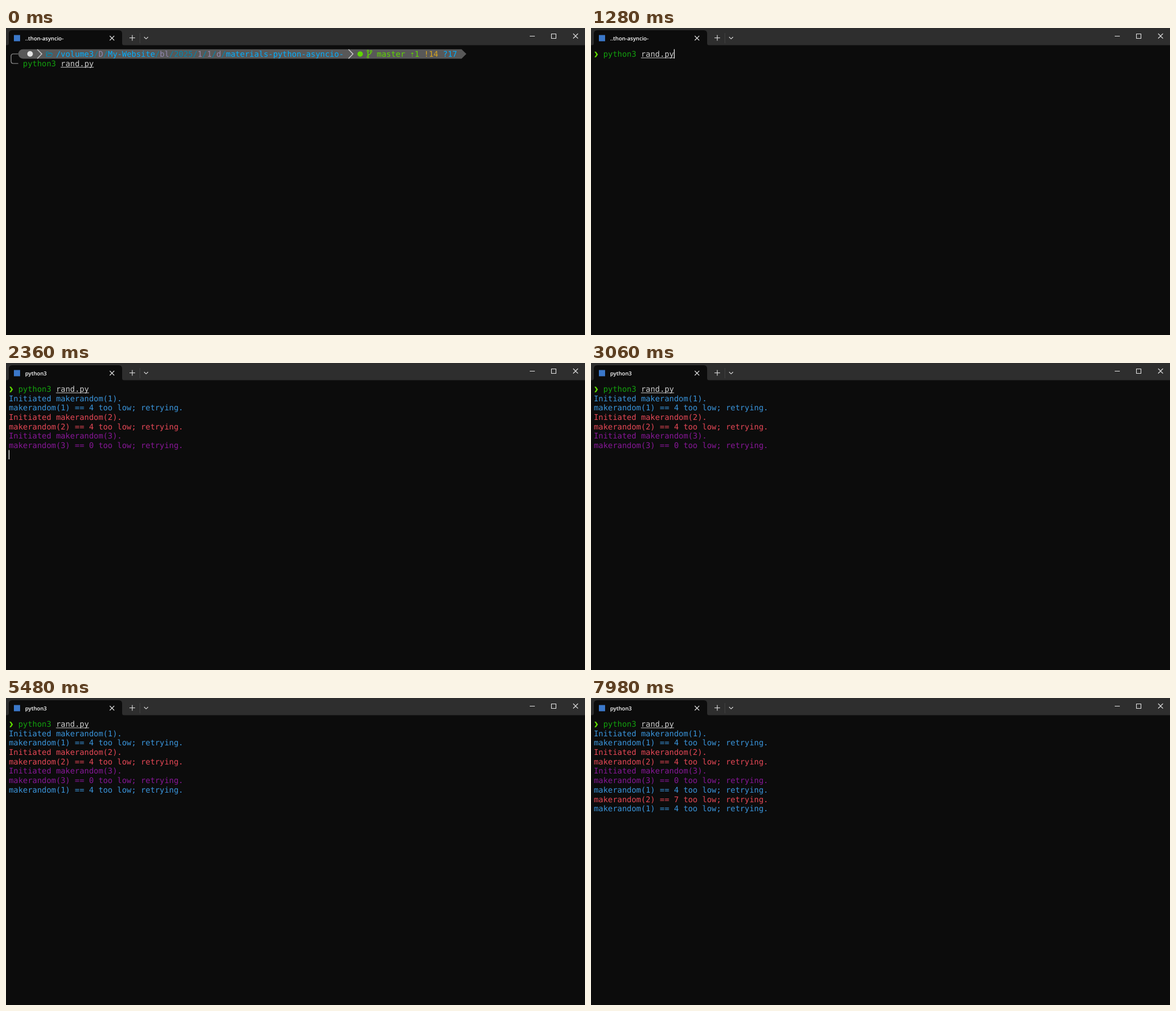
An HTML page for the animation above (8 s loop, 1027 by 545 pixels).

```html
<!DOCTYPE html>
<html lang="en">
<head>
<meta charset="utf-8">
<title>Terminal</title>
<style>
  html, body { margin: 0; width: 100%; height: 100%; overflow: hidden; background: #0c0c0c; }
  svg { display: block; width: 100%; height: 100%; }
  text { white-space: pre; text-rendering: geometricPrecision; }
  .mono { font: 13.9px "DejaVu Sans Mono", monospace; }
  .title { font: 600 9.6px "Open Sans", "Noto Sans", sans-serif; fill: #fff; }
  .line { fill: none; stroke: #e6e6e6; stroke-width: 1.1; }
</style>
</head>
<body>
<svg id="stage" viewBox="0 0 1027 545">
  <rect width="1027" height="545" fill="#0c0c0c"/>
  <rect width="1027" height="30.5" fill="#2e2e2e"/>
  <path d="M1 31Q5 31 5 27V10Q5 4 11 4H200Q206 4 206 10V27Q206 31 210 31Z" fill="#0c0c0c"/>
  <rect x="14" y="12.5" width="11" height="11" fill="#3b78c9"/>
  <text id="title" class="title" x="34" y="21.7"></text>
  <g class="line">
    <path d="M184 14l8 8M192 14l-8 8"/>
    <path d="M224 12.5v10M219 17.5h10"/>
    <path d="M237.5 9v18" stroke="#414141"/>
    <path d="M245 16l3.5 3.3l3.5-3.3"/>
    <path d="M929 14.5h9M967.5 10.5h8v8h-8zM1006 10l8.5 8.5M1014.5 10l-8.5 8.5"/>
  </g>
  <g id="prompt"></g>
  <g id="session"></g>
  <rect id="cursor" width="1.2" height="16.6" fill="#fff"/>
</svg>
<script>
const LOOP = 8000, CELL = 8.37, ROW = 16.7, LEFT = 5, TOP = 37.6;
const START = 1280, FIRST = 1380, SECOND = 4220, THIRD = 7060;
const BLINK = 1535, BLINK_FROM = 1400;
const GREEN = '#13a10e', LIME = '#5fd700', SKY = '#00afff', DIM = '#0087af', MAUVE = '#9187af';
const TASK = ['', '#3a96dd', '#e74856', '#881798'];

const $ = id => document.getElementById(id);
const colX = col => LEFT + col * CELL;
const rowY = row => TOP + row * ROW;

function add(parent, tag, attrs, content) {
  const el = document.createElementNS('http://www.w3.org/2000/svg', tag);
  for (const key in attrs) el.setAttribute(key, attrs[key]);
  if (content) el.textContent = content;
  return parent.appendChild(el);
}

function print(parent, col, row, str, fill) {
  return add(parent, 'text', { class: 'mono', x: colX(col), y: rowY(row) + 13.3, fill }, str);
}

function command(parent, col, row) {
  print(parent, col, row, 'python3', GREEN);
  print(parent, col + 8, row, 'rand.py', '#ccc');
  add(parent, 'rect', { x: colX(col + 8), y: rowY(row) + 14.9, width: 7 * CELL, height: 1, fill: '#ccc' });
}

function buildPrompt() {
  const g = $('prompt');
  const stroke = (d, color, width) =>
    add(g, 'path', { d, fill: 'none', stroke: color, 'stroke-width': width });
  add(g, 'path', { d: 'M30 37.8H808L816.5 46.1L808 54.4H30A8.3 8.3 0 0 1 30 37.8Z', fill: '#585858' });
  stroke('M21.7 46H13Q9 46 9 50V59Q9 63 13 63H21.7', '#a0a0a0', 1.2);
  add(g, 'circle', { cx: 42.7, cy: 46, r: 5, fill: '#e4e4e4' });
  for (const x of [55.5, 607.5]) stroke(`M${x} 38l8 8.1l-8 8.1`, '#c4c4c4', 1.6);
  stroke('M71.5 50.5V42.5h3.5l1 1.5h4.5v1.5M71.5 50.5l2-5h9l-2 5z', DIM, 1);

  const parts = [
    ['/volume3', SKY], ['/', DIM], ['D', MAUVE], ['/', DIM], ['My-Website', SKY], ['/', DIM],
    ['bl', MAUVE], ['/2025/', DIM], ['1', MAUVE], ['/', DIM], ['1', MAUVE], ['/', DIM],
    ['d', MAUVE], ['/', DIM], ['materials-python-asyncio-', SKY]
  ];
  let col = 10;
  for (const [str, color] of parts) {
    print(g, col, 0, str, color);
    col += str.length;
  }

  add(g, 'circle', { cx: 628.2, cy: 46.2, r: 4.8, fill: LIME });
  stroke('M642 42.5V50M647.5 42.5Q647.5 46.5 642 48', LIME, 1.4);
  for (const [cx, cy] of [[642, 41], [647.5, 41.5], [642, 51.5]])
    add(g, 'circle', { cx, cy, r: 1.6, fill: '#585858', stroke: LIME, 'stroke-width': 1.1 });
  print(g, 78, 0, 'master ⇡1', LIME);
  print(g, 88, 0, '!14', '#d7a520');
  print(g, 92, 0, '?17', SKY);
  command(g, 3, 1);
}

const output = [];

function buildSession() {
  const g = $('session');
  add(g, 'path', { d: 'M6.2 42H8.8L12.4 47L8.8 52H6.2L9.3 47Z', fill: LIME });
  command(g, 2, 0);
  const log = (at, task, str) =>
    output.push({ at, el: print(g, 0, output.length + 1, str, TASK[task]) });
  const retry = (at, task, value) =>
    log(at, task, `makerandom(${task}) == ${value} too low; retrying.`);
  [4, 4, 0].forEach((value, i) => {
    log(FIRST, i + 1, `Initiated makerandom(${i + 1}).`);
    retry(FIRST, i + 1, value);
  });
  retry(SECOND, 1, 4);
  retry(THIRD, 2, 7);
  retry(THIRD, 1, 4);
}

// Printing shows the cursor again without restarting the blink timer.
function cursorOn(t) {
  if (t < BLINK_FROM) return t >= 720;
  const tick = Math.floor((t - BLINK_FROM) / BLINK);
  const printed = t >= SECOND && t < BLINK_FROM + 2 * BLINK;
  return printed || tick === 0 || tick === 3;
}

function show(el, on) {
  el.setAttribute('visibility', on ? 'visible' : 'hidden');
}

function render(t) {
  const running = t >= FIRST, cleared = t >= START;
  $('title').textContent = running ? 'python3' : '..thon-asyncio-';
  $('prompt').style.display = cleared ? 'none' : '';
  $('session').style.display = cleared ? '' : 'none';
  let count = 0;
  for (const { at, el } of output) {
    show(el, t >= at);
    if (t >= at) count++;
  }
  const col = running ? 0 : cleared ? 17 : 18;
  const row = running ? count + 1 : cleared ? 0 : 1;
  const cursor = $('cursor');
  cursor.setAttribute('x', colX(col) - 0.2);
  cursor.setAttribute('y', rowY(row));
  show(cursor, cursorOn(t));
}

buildPrompt();
buildSession();
const begin = performance.now();
function loop() {
  render((performance.now() - begin) % LOOP);
  requestAnimationFrame(loop);
}
loop();
</script>
</body>
</html>
```
